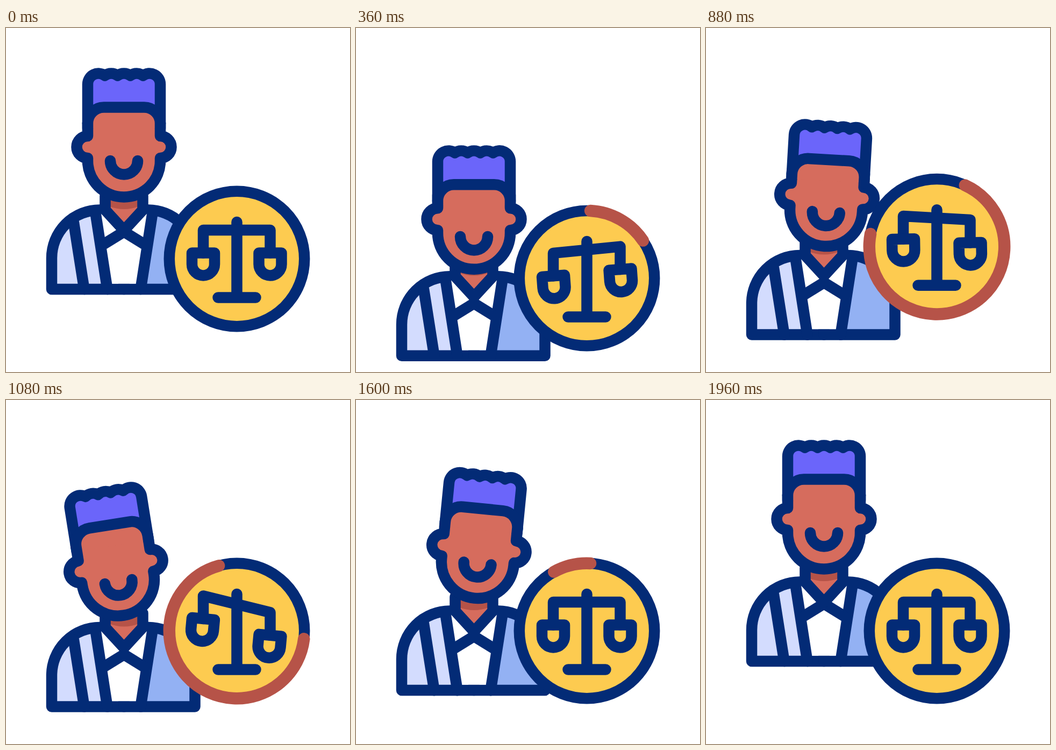
These frames come from a looping animation (640x640 px, 2 s). An HTML page:

```html
<!DOCTYPE html>
<html lang="en">
<head>
<meta charset="utf-8">
<title>Judge</title>
<style>
  html, body { margin: 0; width: 100%; height: 100%; overflow: hidden; background: #fff; }
  svg { display: block; width: 100vw; height: 100vh; }
  .line { fill: none; stroke: #032b76; stroke-width: 20.5; stroke-linecap: round; stroke-linejoin: round; }
  .skin { fill: #d66c5d; }
  .dark { fill: #b65348; }
  .hat { fill: #6b65fa; }
  .pale { fill: #d3dcfe; }
  .blue { fill: #93b1f3; }
  .white { fill: #fff; }
  .gold { fill: #fdcb50; }
  #arc { fill: none; stroke: #b65348; stroke-width: 22.5; stroke-linecap: round; }
</style>
</head>
<body>
<svg viewBox="0 0 640 640">
  <g id="body">
    <path class="line pale" d="M85 486V428a89.5 89.5 0 0 1 89.5-89.5H219.5V486Z"/>
    <path class="line blue" d="M351.5 486V425.5a87 87 0 0 0-87-87H219.5V486Z"/>
    <path class="white" d="M166 340L187 475.75H252L273 340Z"/>
    <path class="line" d="M126 362L145.5 486M166 341L188.5 486M273 341L250.5 486"/>
    <path class="line" id="lapels" d="M183 401.5L219.5 379L256 401.5"/>
    <path class="skin" d="M184.5 310H254.5V338L219.5 376.5L184.5 338Z"/>
    <path class="dark" d="M190 310H249V331Q219.5 343 190 331Z"/>
    <path class="line" d="M184.5 312V338.5L219.5 376.5L254.5 338.5V312"/>
  </g>
  <g id="head">
    <path class="line skin" d="M152 176V201a20.5 20.5 0 0 0 0 41V247a67.5 67.5 0 0 0 135 0V242a20.5 20.5 0 0 0 0-41V176"/>
    <path class="line" id="mouth" d="M194 247a25.5 25.5 0 0 0 51 0"/>
    <g id="hair">
      <path class="line hat" id="curls"/>
      <path class="line skin" d="M152 187V177.5a30 30 0 0 1 30-30h75a30 30 0 0 1 30 30V187"/>
    </g>
  </g>
  <g id="badge">
    <circle class="line gold" cx="429.5" cy="429.5" r="125.7"/>
    <circle id="arc" cx="429.5" cy="429.5" r="125.7" pathLength="1" transform="rotate(-87 429.5 429.5)"/>
    <path class="line" d="M429.5 361V501.5M394.5 501.5H464.5"/>
    <path class="line" id="beam"/>
    <path class="line" id="left" d="M-21 0H21V21a21 21 0 0 1-42 0Z"/>
    <use href="#left" id="right"/>
  </g>
</svg>
<script>
const $ = id => document.getElementById(id);
const set = (id, name, value) => $(id).setAttribute(name, value);
const move = (id, y) => set(id, 'transform', `translate(0 ${y})`);

// 0 to 1 between times a and b, with soft ends
function ease(t, a, b) {
  const x = Math.min(1, Math.max(0, (t - a) / (b - a)));
  return x * x * (3 - 2 * x);
}
// 0 up to 1 at the peak and back to 0
const bump = (t, a, peak, b) => ease(t, a, peak) - ease(t, peak, b);

function drawCurls() {
  const count = 5, step = 23.7;
  let d = 'M152 178V104.5';
  for (let i = 1; i <= count; i++) {
    const end = i < count ? `${160.2 + i * step} 88.5` : '287 104.5';
    d += `A20 20 0 0 1 ${end}`;
  }
  set('curls', 'd', d + 'V178');
}

function drawPerson(t) {
  const duck = bump(t, 80, 400, 560);
  const rise = ease(t, 1370, 1940);
  const drop = 129 * duck + 84.5 * (ease(t, 400, 560) - rise);
  const nod = 11 * duck + 7.5 * bump(t, 600, 820, 1200);
  const tilt = 5.8 * bump(t, 560, 800, 1120)
    - 9.7 * bump(t, 800, 1120, 1540) + 6 * bump(t, 1120, 1540, 1940);
  move('body', drop);
  move('lapels', 10 * (ease(t, 80, 400) - rise));
  set('head', 'transform', `translate(0 ${drop + nod}) rotate(${tilt} 219.5 317)`);
  move('hair', 10 * duck + 7 * bump(t, 600, 820, 1120) - 4 * bump(t, 820, 1120, 1500));
  move('mouth', 7 * duck + 4 * (ease(t, 600, 820) - rise));
}

function drawScales(t) {
  const angle = 14 * bump(t, 660, 1060, 1460) - 11.8 * bump(t, 80, 660, 1060);
  const swing = 5.3 * bump(t, 640, 1100, 1460) - 8.3 * bump(t, 80, 640, 1100);
  const lift = 62.25 * Math.tan(angle * Math.PI / 180);
  const y = 376 + 0.02 * angle * angle;
  const hang = 42.5;
  const pan = (x, y) => `translate(${x} ${y + hang}) rotate(${swing})`;
  set('beam', 'd', `M367 ${y - lift + hang}v${-hang}L491.5 ${y + lift}v${hang}`);
  set('left', 'transform', pan(367, y - lift));
  // The copy carries the left pan's transform, so it only needs the offset
  set('right', 'transform', `translate(124.5 ${2 * lift})`);
}

function drawBadge(t) {
  move('badge', 37 * bump(t, 80, 390, 850) - 24 * bump(t, 390, 850, 1070));
  const start = ease(t, 720, 1800);
  const length = ease(t, 80, 1240) - start;
  set('arc', 'visibility', length > 0.0001 ? 'visible' : 'hidden');
  set('arc', 'stroke-dasharray', `${Math.max(0, length)} 2`);
  set('arc', 'stroke-dashoffset', -start);
  drawScales(t);
}

drawCurls();
const begin = performance.now();
function frame() {
  const t = (performance.now() - begin) % 2000;
  drawPerson(t);
  drawBadge(t);
  requestAnimationFrame(frame);
}
frame();
</script>
</body>
</html>
```
